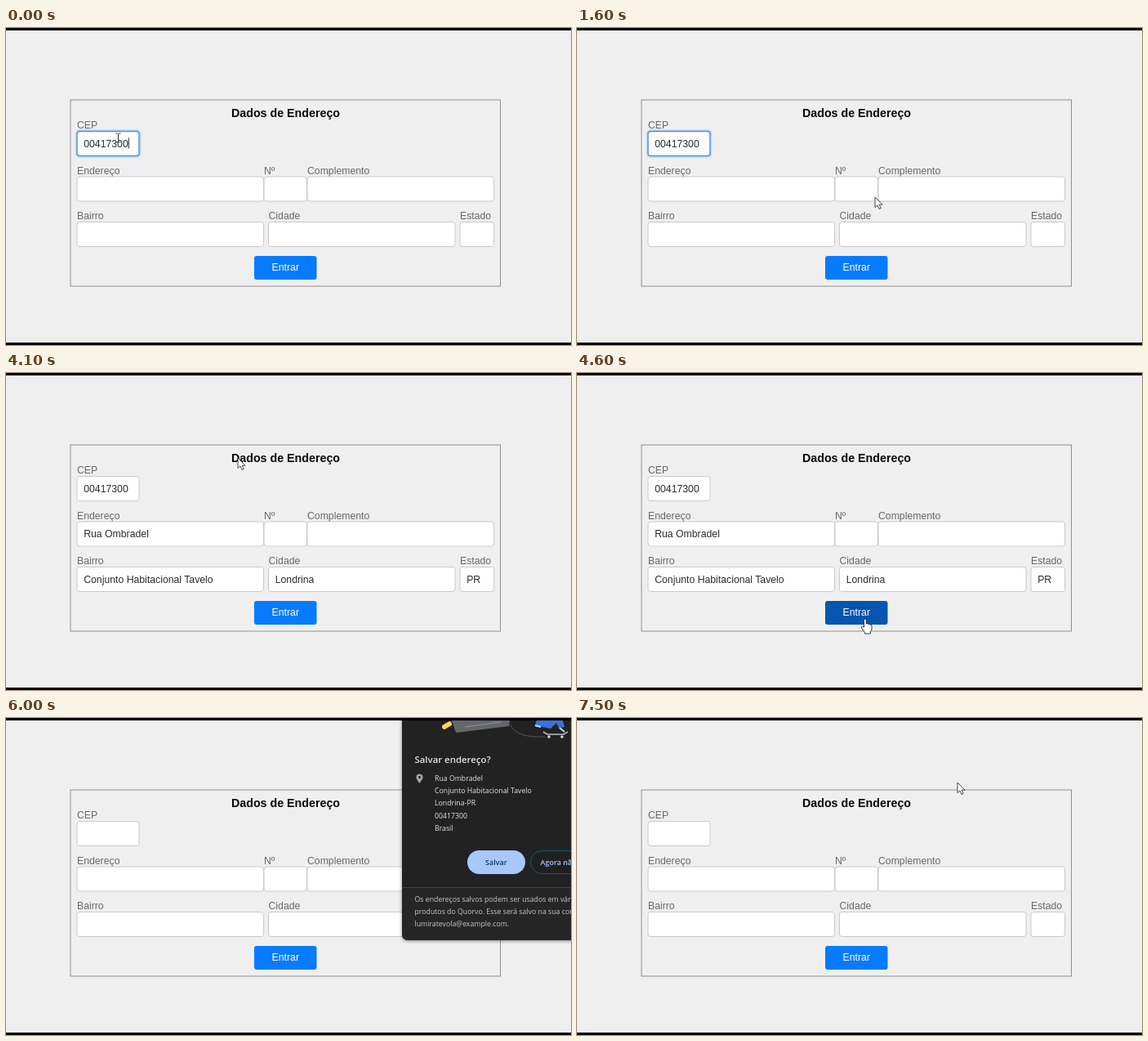
Recreate the animation shown at these times as an HTML page. Size 692x388 px, loop 7.6 s.

```html
<!DOCTYPE html>
<html lang="pt-BR">
<head>
<meta charset="utf-8">
<title>Dados de Endereço</title>
<style>
  html, body { margin: 0; width: 100%; height: 100%; overflow: hidden; background: #efefef; }
  svg { display: block; width: 100%; height: 100%; }
  text { white-space: pre; }
  #form text { font: 12.25px "Liberation Sans", Arial, sans-serif; }
  #form .title { font-weight: bold; font-size: 14.25px; text-anchor: middle; fill: #080808; }
  #form .label { fill: #686868; }
  #form .value { fill: #2b2b2b; }
  #form .action { fill: #fff; text-anchor: middle; }
  .field { fill: #fff; stroke: #c9c9c9; }
  #popup text { font: 8.75px "Open Sans", "Noto Sans", sans-serif; fill: #e3e3e3; }
  #popup .heading { font-size: 11.4px; font-weight: 600; }
  #popup .note { fill: #c7c7c7; }
  #popup .button { font-weight: 600; font-size: 9px; }
</style>
</head>
<body>
<svg viewBox="0 0 692 388">
  <defs>
    <filter id="shadow" x="-10%" y="-10%" width="120%" height="120%">
      <feDropShadow dx="0" dy="1" stdDeviation="2" flood-opacity=".45"/>
    </filter>
  </defs>
  <rect width="692" height="388" fill="#efefef"/>

  <g id="form">
    <rect x="79" y="88" width="526.5" height="228" fill="none" stroke="#8f8f8f"/>
    <text class="title" x="342.5" y="109">Dados de Endereço</text>
    <g id="fields"></g>
    <g id="focus" fill="none">
      <rect x="86" y="125.500" width="78" height="32" rx="4" stroke="#8fc3ff" stroke-opacity=".5" stroke-width="2.5"/>
      <rect x="87" y="126.500" width="76" height="30" rx="3" stroke="#4795e4" stroke-width="1.3"/>
    </g>
    <path id="caret" d="M150.300 134.500V147.500" stroke="#222"/>
    <rect id="submit" x="304" y="279" width="76.500" height="29" rx="3"/>
    <text class="action" x="342.300" y="297.400">Entrar</text>
  </g>

  <g id="popup">
    <path d="M485 0H710V272H493Q485 272 485 264Z" fill="#202020" filter="url(#shadow)"/>
    <path d="M485 207.500H692V272H493Q485 272 485 264Z" fill="#262626"/>
    <path d="M485 207.500H692" stroke="#444"/>
    <rect x="533.500" y="6" width="13" height="6" rx="3" fill="#fdd45b" transform="rotate(-30 540 9)"/>
    <path d="M546 3H617L616 10L551 18Z" fill="#64676c"/>
    <path d="M562 11L606 5" stroke="#85888c" stroke-width="1.500"/>
    <path d="M617 8C624 20 638 24 660 23" fill="none" stroke="#55585c"/>
    <path d="M650 3H682L684 11L677 12L674 6L667 13L648 9Z" fill="#3874d8"/>
    <path d="M648 9L655 11M678 12L684 17" stroke="#c8d9f7" stroke-width="2"/>
    <path d="M658 17L663 20H683L688 17" fill="none" stroke="#b9bcc0" stroke-width="1.500"/>
    <g fill="#d5d7da"><circle cx="665" cy="23" r="1.800"/><circle cx="681" cy="23" r="1.800"/></g>
    <text class="heading" x="500.500" y="55">Salvar endereço?</text>
    <path d="M506.500 80C504 76.500 502.500 74.500 502.500 72.500A4 4 0 0 1 510.500 72.500C510.500 74.500 509 76.500 506.500 80Z" fill="#a2a5a9"/>
    <circle cx="506.500" cy="72.500" r="1.400" fill="#202020"/>
    <g id="address"></g>
    <rect id="ring" x="562.500" y="159.500" width="76" height="34" rx="17" fill="none" stroke="#a8c7fa" stroke-width="1.700"/>
    <rect x="565" y="162" width="71" height="29" rx="14.500" fill="#a8c7fa"/>
    <text class="button" x="600.300" y="180" text-anchor="middle" style="fill:#123667">Salvar</text>
    <rect id="later" x="642.500" y="162.500" width="80" height="28" rx="14" stroke="#135a78"/>
    <text class="button" x="654.500" y="180" style="fill:#a8c7fa">Agora não</text>
    <g id="notes"></g>
  </g>

  <path d="M0 1.500H692M0 386.500H692" stroke="#000" stroke-width="3"/>

  <g id="pointer" stroke-linejoin="round">
    <path id="beam" d="M-3 -5Q-.5 -5 0 -4Q.5 -5 3 -5M0 -4V5M-3 6Q-.5 6 0 5Q.5 6 3 6" fill="none" stroke="#333"/>
    <path id="arrow" d="M0 0V12.500L3 9.800L5 14.500L7.200 13.500L5.200 9.200H9Z" fill="#fff" stroke="#333" stroke-width=".9"/>
    <path id="hand" d="M-1.500 10V1.500Q-1.500 0 0 0T1.500 1.500V6Q3.200 5 4 6.500Q5.500 5.700 6 7.200Q8 6.600 8 8.500V12Q8 14 6.500 15.500V18H-.5V16.500L-4.500 11Q-5 9.500 -3.500 9Z" fill="#fff" stroke="#222" stroke-width=".9"/>
  </g>
</svg>

<script>
const $ = id => document.getElementById(id);
const LOOP = 7600, STEP = 100;

// label, x, y, width, value
const FIELDS = [
  ["CEP", 87, 126.5, 76, "00417300"],
  ["Endereço", 87, 182, 228.5, "Rua Ombradel"],
  ["Nº", 316, 182, 52.5, ""],
  ["Complemento", 369, 182, 228.5, ""],
  ["Bairro", 87, 237.5, 228.5, "Conjunto Habitacional Tavelo"],
  ["Cidade", 321.5, 237.5, 228.5, "Londrina"],
  ["Estado", 556, 237.5, 41.5, "PR"]
];

// time, x, y, shape; an empty shape hides the pointer
const PATH = [
  [0, 137.5, 134, "beam"], [300, 137.5, 134, "beam"], [500, 190, 172, "arrow"],
  [700, 310, 272, "arrow"], [800, 352, 322, "arrow"], [900, 365, 314, "arrow"],
  [1000, 373, 300, "hand"], [1100, 376, 298, "hand"], [1400, 376, 298, "hand"],
  [1500, 371, 262, "arrow"], [1600, 365, 207, "arrow"], [1900, 358, 152.5, "arrow"],
  [3600, 358, 152.5, ""], [4100, 284, 104, "arrow"], [4300, 300, 180, "arrow"],
  [4500, 346, 288, "hand"], [4600, 353, 301, "hand"], [5500, 353, 301, "hand"],
  [5600, 677, 220, "arrow"], [5800, 677, 220, "arrow"], [6100, 700, 194, ""],
  [6600, 686.5, 174, "arrow"], [6900, 686.5, 174, "arrow"], [7000, 670, 168, "arrow"],
  [7200, 560, 116, "arrow"], [7500, 466, 79, "arrow"], [7600, 466, 79, "arrow"]
];

// visible spans of each state
const SPANS = {
  caret: [[0, 200], [700, 1200], [1700, 2100]],
  focus: [[0, 2100]],
  hover: [[1000, 1500], [4500, 5900]],
  filled: [[3200, 5200]],
  popup: [[5200, 7000]],
  later: [[6300, 7000]],
  ring: [[6800, 7000]]
};

function add(parent, tag, attrs, content = "") {
  const el = document.createElementNS("http://www.w3.org/2000/svg", tag);
  for (const key in attrs) el.setAttribute(key, attrs[key]);
  el.textContent = content;
  return parent.appendChild(el);
}

const values = FIELDS.map(([label, x, y, width, value]) => {
  add($("fields"), "text", { class: "label", x, y: y - 3.2 }, label);
  add($("fields"), "rect", { class: "field", x, y, width, height: 30, rx: 3 });
  return add($("fields"), "text", { class: "value", x: x + 8.2, y: y + 19.2 }, value);
});

const [cep, street, , , district] = FIELDS.map(field => field[4]);
[street, district, "Londrina-PR", cep, "Brasil"].forEach((line, i) =>
  add($("address"), "text", { x: 525, y: 77 + i * 15.2 }, line));
["Os endereços salvos podem ser usados em vários",
 "produtos do Quorvo. Esse será salvo na sua conta",
 "lumiratevola@example.com."].forEach((line, i) =>
  add($("notes"), "text", { class: "note", x: 500.5, y: 225 + i * 15.2 }, line));

const active = (name, t) => SPANS[name].some(([from, to]) => t >= from && t < to);
const show = (el, on) => { el.style.visibility = on ? "visible" : "hidden"; };
const toggle = (el, on) => { el.style.display = on ? "" : "none"; };

function placePointer(t) {
  const i = PATH.findIndex(key => key[0] > t) - 1;
  const [t0, x0, y0, shape] = PATH[i], [t1, x1, y1] = PATH[i + 1];
  const p = (t - t0) / (t1 - t0);
  $("pointer").setAttribute("transform",
    `translate(${x0 + (x1 - x0) * p} ${y0 + (y1 - y0) * p})`);
  for (const id of ["beam", "arrow", "hand"]) toggle($(id), id === shape);
}

function draw(t) {
  placePointer(t);
  for (const id of ["caret", "focus", "popup", "ring"]) toggle($(id), active(id, t));
  values.forEach((el, i) => show(el, i ? active("filled", t) : t < 5200));
  $("submit").setAttribute("fill", active("hover", t) ? "#0555b1" : "#077bfd");
  $("later").setAttribute("fill", active("later", t) ? "#30373d" : "#202020");
}

const start = performance.now();
function tick() {
  const t = (performance.now() - start) % LOOP;
  draw(Math.floor(t / STEP) * STEP);
  requestAnimationFrame(tick);
}
tick();
</script>
</body>
</html>
```
